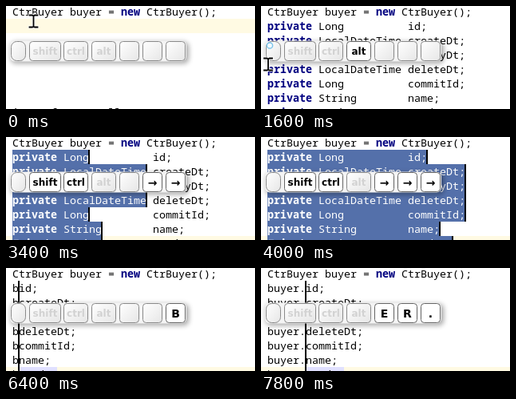
These frames come from a looping animation (312 by 129 pixels, 8 s). An HTML page:

```html
<!DOCTYPE html>
<html lang="en">
<head>
<meta charset="utf-8">
<title>Column editing</title>
<style>
  html, body { margin: 0; width: 100%; height: 100%; overflow: hidden; background: #fff; }
  svg { display: block; width: 312px; height: 129px; }
  text { white-space: pre; }
  .code { font: 13.333px "Noto Sans Mono", "DejaVu Sans Mono", monospace; }
  .code .kw { font-weight: bold; }
  .key { font: bold 12px "DejaVu Sans", sans-serif; text-anchor: middle; }
</style>
</head>
<body>
<svg viewBox="0 0 312 129">
  <defs>
    <filter id="blur" x="-10%" y="-60%" width="120%" height="220%">
      <feGaussianBlur stdDeviation="3.2"/>
    </filter>
    <linearGradient id="cap" x2="1" y2="1">
      <stop offset="0" stop-color="#fff"/>
      <stop offset="1" stop-color="#e6e6e6"/>
    </linearGradient>
    <path id="beam" d="M-5-7.5h3.5L0-6.5 1.5-7.5H5M0-6.5V6.5M-5 7.5h3.5L0 6.5 1.5 7.5H5"/>
  </defs>
  <rect width="312" height="129" fill="#fff"/>
  <g id="editor"></g>
  <rect x="6" y="45" width="223" height="27" rx="6" fill="#000" opacity=".34" filter="url(#blur)"/>
  <rect x="5" y="43.5" width="221" height="26" rx="6" fill="#f4f4f4"/>
  <g id="keys"></g>
  <g id="mouse" fill="none" stroke-linecap="square">
    <use href="#beam" stroke="#fff" stroke-width="3.6"/>
    <use href="#beam" stroke="#000" stroke-width="1.8"/>
  </g>
</svg>
<script>
const LOOP = 8000, LEFT = 8, CHAR = 8, LINE = 18, TOP = -2, NAME_COL = 22;
const INK = '#000', NAVY = '#000080', BLUE = '#5470aa', YELLOW = '#fffae3', LILAC = '#e0e0ff';
const PREFIX = 'buyer.';
const FIELDS = [
  ['Long', 'id'], ['LocalDateTime', 'createDt'], ['LocalDateTime', 'modifyDt'],
  ['LocalDateTime', 'deleteDt'], ['Long', 'commitId'], ['String', 'name'], ['String', 'vendor']
];

// Each track lists [start time, value]; a value holds until the next one.
const TRACKS = {
  pasted: [[0, false], [700, true]],
  row: [[0, 1], [700, 0], [1400, 1], [1600, 0], [1700, 7]],
  caret: [[0, 0], [100, 1], [700, 0], [1700, 7], [2900, 0], [3200, 7]],
  select: [[0, 0], [3200, 1], [3400, 2], [3600, 3], [4000, 4], [4600, 3], [5200, 5], [6400, 0]],
  typed: [[0, 0], [6400, 1], [6900, 2], [7100, 3], [7300, 4], [7500, 5], [7800, 6]],
  usage: [[0, false], [6000, true]],
  click: [[0, false], [1400, true], [2500, false]],
  shift: [[0, false], [2900, true], [5600, false]],
  ctrl: [[0, false], [200, true], [1000, false], [2900, true], [5600, false]],
  alt: [[0, false], [1200, true], [2900, false]],
  recent: [[0, '   '], [300, '  V'], [1000, '   '], [2900, '  →'], [3300, ' →→'], [3500, '→→→'],
    [4500, '→→←'], [4600, '→ ←'], [4900, '  ←'], [5100, ' ←←'], [5600, ' ← '], [5700, '   '],
    [6200, '  B'], [6800, ' BU'], [7100, 'BUY'], [7300, 'UYE'], [7500, 'YER'], [7600, 'ER.']]
};

const $ = id => document.getElementById(id);
const colX = col => LEFT + col * CHAR;
const lineY = line => TOP + line * LINE;

function stateAt(t) {
  const state = {};
  for (const [name, track] of Object.entries(TRACKS))
    for (const [start, value] of track) if (t >= start) state[name] = value;
  return state;
}

function box(x, y, w, h, fill, extra = '') {
  return `<rect x="${x}" y="${y}" width="${w}" height="${h}" fill="${fill}" ${extra}/>`;
}

function write(line, col, str, fill = INK, cls = '') {
  return `<text class="code"><tspan class="${cls}" x="${colX(col)}" y="${lineY(line) + 14}" fill="${fill}">${str}</tspan></text>`;
}

function selectionEnd(stage, type, name) {
  return [0, 7, 8 + type.length, NAME_COL + name.length, NAME_COL + name.length + 1, NAME_COL][stage];
}

function drawField(line, [type, name], s) {
  const y = lineY(line), end = selectionEnd(s.select, type, name);
  const nameCol = s.typed || NAME_COL;
  let out = '';
  if (s.usage && line === 7) out += box(colX(nameCol), y, name.length * CHAR, LINE, LILAC);
  if (end) out += box(LEFT, y, end * CHAR, LINE, BLUE);
  if (s.typed) {
    out += write(line, 0, PREFIX.slice(0, s.typed));
  } else {
    out += write(line, 0, 'private', end ? '#fff' : NAVY, 'kw');
    out += write(line, 8, type, end > 8 ? '#fff' : INK);
  }
  out += write(line, nameCol, name, end > NAME_COL ? '#fff' : INK);
  out += write(line, nameCol + name.length, ';', end > NAME_COL + name.length ? '#fff' : INK);
  if (line <= s.caret) out += box(colX(s.typed || end) - 1, y, 2, LINE, INK);
  return out;
}

function drawEditor(s) {
  let out = s.row ? box(0, lineY(s.row), 312, LINE, YELLOW) : '';
  out += write(0, 0, 'CtrBuyer buyer =') + write(0, 17, 'new', NAVY, 'kw') + write(0, 21, 'CtrBuyer();');
  if (s.pasted) {
    FIELDS.forEach((field, i) => { out += drawField(i + 1, field, s); });
  } else {
    out += write(7, 0, 'item.of(name, all);');
    if (s.caret) out += box(LEFT - 1, lineY(1), 2, LINE, INK);
  }
  return out;
}

function drawCap(x, w, radius, lit) {
  return box(x + .5, 44.5, w - 1, 24, lit ? '#fff' : 'url(#cap)', `rx="${radius}" stroke="${lit ? '#666' : '#8a8a8a'}"`);
}

function drawKey(x, w, label, lit) {
  const size = label.length > 1 ? 12 : 14;
  return drawCap(x, w, 4, lit) +
    `<text class="key" x="${x + w / 2}" y="${size === 12 ? 61 : 62}" style="font-size:${size}px" fill="${lit ? '#000' : '#d2d2d2'}">${label}</text>`;
}

function drawKeys(s) {
  let out = drawCap(6, 19, 7, false);
  if (s.click) out += '<circle cx="11" cy="49.5" r="3.6" fill="#f4fbff" stroke="#7cc4ea" stroke-width="1.5"/>';
  out += drawKey(29, 40, 'shift', s.shift) + drawKey(72, 31, 'ctrl', s.ctrl) + drawKey(107, 31, 'alt', s.alt);
  [...s.recent].forEach((ch, i) => { out += drawKey(142 + i * 29, 25, ch.trim(), ch !== ' '); });
  return out;
}

function mouseAt(t) {
  const glide = (from, to) => Math.min(1, Math.max(0, (t - from) / (to - from)));
  const p = glide(700, 1400), ease = p * p * (3 - 2 * p);
  const y = 19 + 2 * ease + 52 * glide(1500, 1600) + 65 * glide(1600, 1800);
  return [34.5 - 25.5 * ease, y];
}

let lastTick = -1;
function render(time) {
  const t = Math.floor(time % LOOP / 100) * 100;
  if (t === lastTick) return;
  lastTick = t;
  const s = stateAt(t);
  $('editor').innerHTML = drawEditor(s);
  $('keys').innerHTML = drawKeys(s);
  $('mouse').setAttribute('transform', `translate(${mouseAt(t).map(v => v.toFixed(1))})`);
}

let began;
function tick(now) {
  began ??= now;
  render(now - began);
  requestAnimationFrame(tick);
}
render(0);
requestAnimationFrame(tick);
</script>
</body>
</html>
```
